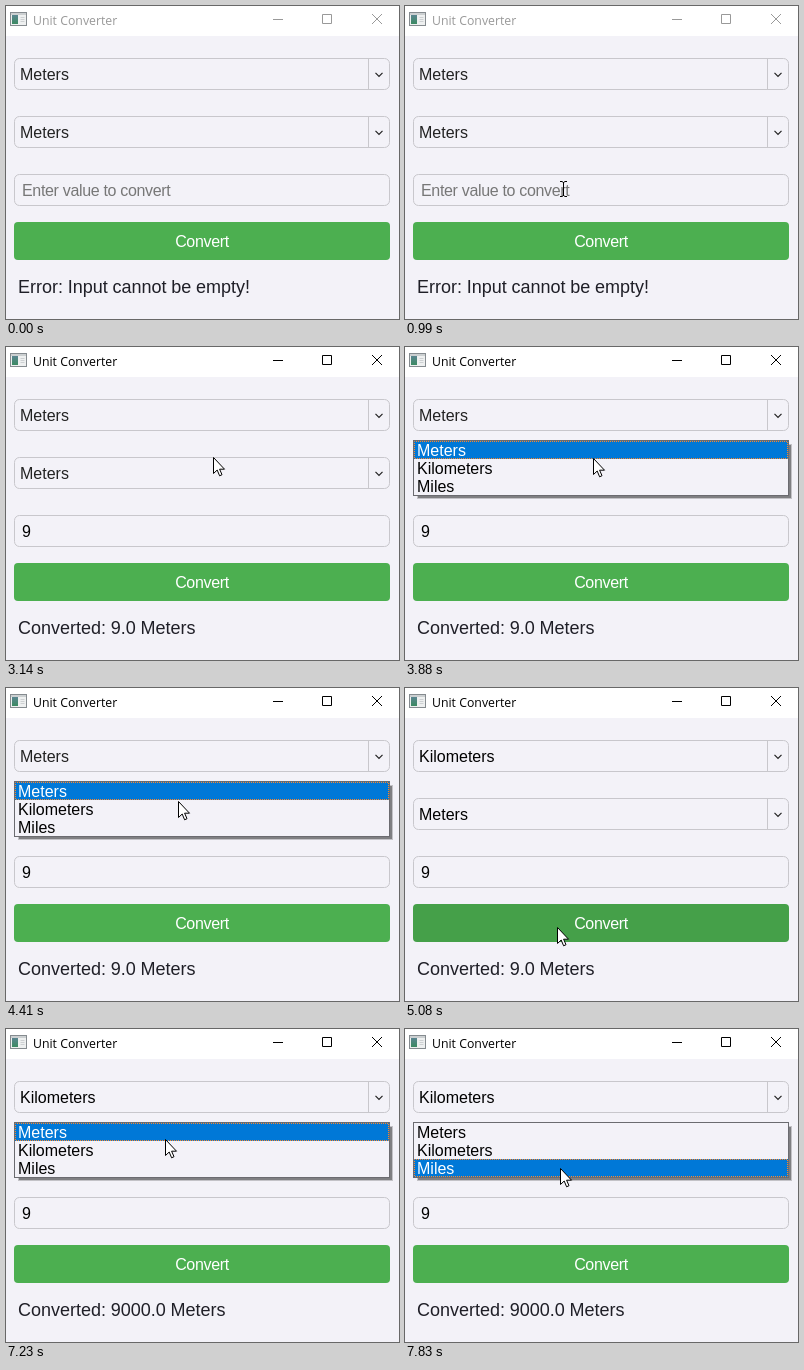
Recreate the animation shown at these times as an HTML page. Size 393 by 313 pixels, loop 8 s.

```html
<!DOCTYPE html>
<html lang="en">
<head>
<meta charset="utf-8">
<title>Unit Converter</title>
<style>
html, body { margin: 0; width: 100%; height: 100%; overflow: hidden; background: #f3f2f8; }
svg { display: block; font: 16px "Liberation Sans", Arial, sans-serif; }
.line { fill: none; stroke: #c8c7cc; }
.tight { letter-spacing: -.33px; }
#bar { font: 12.3px "Open Sans", "Noto Sans", sans-serif; }
#result { font-size: 18px; word-spacing: -.3px; }
</style>
</head>
<body>
<svg width="393" height="313" viewBox="0 0 393 313">
  <defs>
    <clipPath id="roll"><rect id="rollBox" x="0" y="93" width="393" height="60"/></clipPath>
    <linearGradient id="pane" x2="0" y2="1"><stop stop-color="#5a8590"/><stop offset="1" stop-color="#3c8a62"/></linearGradient>
    <g id="combo">
      <rect class="line" x="8.5" y=".5" width="375" height="31" rx="5"/>
      <path class="line" d="M362.5 1V31"/>
      <path d="M369.5 14.8l3.5 3.5 3.5-3.5" fill="none" stroke="#222" stroke-width="1.2"/>
    </g>
  </defs>

  <rect width="393" height="30" fill="#fff"/>
  <rect x="4.5" y="6.5" width="16" height="13" fill="#eef0f0" stroke="#858b8f"/>
  <path d="M5 8H20" stroke="#a9afb2"/>
  <rect x="6" y="9" width="6" height="9" fill="url(#pane)"/>
  <path d="M14.5 11.5h4m-4 2h4m-4 2h4" stroke="#cdd0d2"/>
  <g id="bar">
    <text x="27" y="19">Unit Converter</text>
    <path d="M267 13.5H277M316.5 8.5h9v9h-9zM366 8l10 10m0-10l-10 10" fill="none" stroke="currentColor"/>
  </g>

  <use href="#combo" y="52"/>
  <use href="#combo" y="110"/>
  <g id="units">
    <text id="from" x="14" y="74"></text>
    <text x="14" y="132">Meters</text>
  </g>

  <rect class="line" x="8.5" y="168.5" width="375" height="31" rx="5"/>
  <text id="hint" class="tight" x="16" y="190" fill="#777">Enter value to convert</text>
  <text id="value" x="16" y="190">9</text>
  <rect id="caret" y="175" width="1" height="18"/>

  <rect id="button" x="8" y="216" width="376" height="38" rx="4"/>
  <text class="tight" x="196" y="241" fill="#fff" text-anchor="middle">Convert</text>
  <text id="result" x="12" y="287" fill="#1f1f27"></text>

  <g id="popup" clip-path="url(#roll)">
    <rect x="12" y="97" width="375" height="55" opacity=".2"/>
    <rect x="13" y="98" width="373" height="53" opacity=".35"/>
    <rect x="8.5" y="93.5" width="375" height="55" fill="#f3f2f8" stroke="#6b6b70"/>
    <g id="mark">
      <rect x="9" y="94" width="374" height="18" fill="#0078d7"/>
      <rect x="9.5" y="94.5" width="373" height="17" fill="none" stroke="#ff8728" stroke-dasharray="1" stroke-dashoffset=".5"/>
    </g>
    <g id="items">
      <text x="12" y="109">Meters</text>
      <text x="12" y="127">Kilometers</text>
      <text x="12" y="145">Miles</text>
    </g>
  </g>

  <path id="arrow" d="M.5 .5V16.5L4.2 13 6.6 18.8 9 17.7 6.6 12.2H11.5Z" fill="#fff" stroke="#000"/>
  <path id="beam" d="M-3 -7.5H-1L.5 -6.5 2 -7.5H4M.5 -7V7M-3 7.5H-1L.5 6.5 2 7.5H4" fill="none" stroke="#000"/>
</svg>
<script>
const LOOP = 8000, TICK = 66, BLINK = 530;
const FOCUS = 1070, TYPE = 2000, BLUR = 2590, CONVERT = 2660, RECONVERT = 5630;
const OPEN = 3620, PICK = 4670, REOPEN = 7030;

// Key points of the pointer: start time, ticks to get there, x, y
const stops = [
  [460, 2, 255, 208], [600, 3, 158, 183],  // enter the window, rest on the input
  [2130, 4, 172, 242],                     // press Convert
  [3070, 3, 225, 44], [3350, 1, 210, 64],  // open the list
  [3680, 4, 188, 111], [3950, 1, 187, 106],
  [4410, 1, 172, 113], [4550, 2, 165, 127], [4740, 1, 158, 182],
  [4880, 4, 152, 239],                     // press Convert again
  [6230, 5, 166, 73], [6640, 1, 166, 61],  // open the list again
  [7030, 4, 159, 110], [7290, 1, 155, 120], [7490, 1, 156, 127], [7770, 2, 153, 150]
];

const $ = id => document.getElementById(id);
const show = (id, on) => $(id).setAttribute('visibility', on ? 'visible' : 'hidden');
const ticks = (t, start) => 1 + Math.floor((t - start) / TICK);

function pointer(t) {
  let x = 411, y = 328;
  for (const [start, count, toX, toY] of stops) {
    if (t < start) break;
    const k = Math.min(1, ticks(t, start) / count);
    x += (toX - x) * k;
    y += (toY - y) * k;
  }
  return [Math.round(x), Math.round(y)];
}

function draw(t) {
  const [x, y] = pointer(t);
  const picked = t >= PICK, typed = t >= TYPE;
  const open = t >= REOPEN || (t >= OPEN && !picked);
  const over = (top, bottom) => !open && y >= top && y < bottom;
  const overInput = over(168, 200);

  $('bar').style.color = $('bar').style.fill = t < FOCUS ? '#999' : '#000';
  $('units').style.fill = picked ? '#000' : '#222';
  $('from').textContent = picked ? 'Kilometers' : 'Meters';
  $('button').style.fill = over(216, 254) ? '#45a049' : '#4caf50';
  $('result').textContent = t < CONVERT
    ? 'Error: Input cannot be empty!'
    : `Converted: ${(t < RECONVERT ? 9 : 9000).toFixed(1)} Meters`;

  show('hint', !typed);
  show('value', typed);
  const shown = (t - (typed ? TYPE : FOCUS)) % (2 * BLINK) < BLINK;
  show('caret', t >= FOCUS && t < BLUR && shown);
  $('caret').setAttribute('x', typed ? 25 : 16);

  // The list rolls down in three ticks; the row under the pointer is marked
  show('popup', open);
  const rolled = Math.min(1, ticks(t, t < REOPEN ? OPEN : REOPEN) / 3);
  $('rollBox').setAttribute('height', Math.max(0, 60 * rolled));
  const row = Math.max(0, Math.min(2, Math.floor((y - 96) / 18)));
  $('mark').setAttribute('transform', `translate(0 ${18 * row})`);
  [...$('items').children].forEach((el, i) => el.style.fill = i === row ? '#fff' : '#000');

  show('arrow', !overInput);
  show('beam', overInput);
  for (const id of ['arrow', 'beam']) $(id).setAttribute('transform', `translate(${x} ${y})`);
}

const begin = performance.now();
function frame() {
  draw((performance.now() - begin) % LOOP);
  requestAnimationFrame(frame);
}
frame();
</script>
</body>
</html>
```
